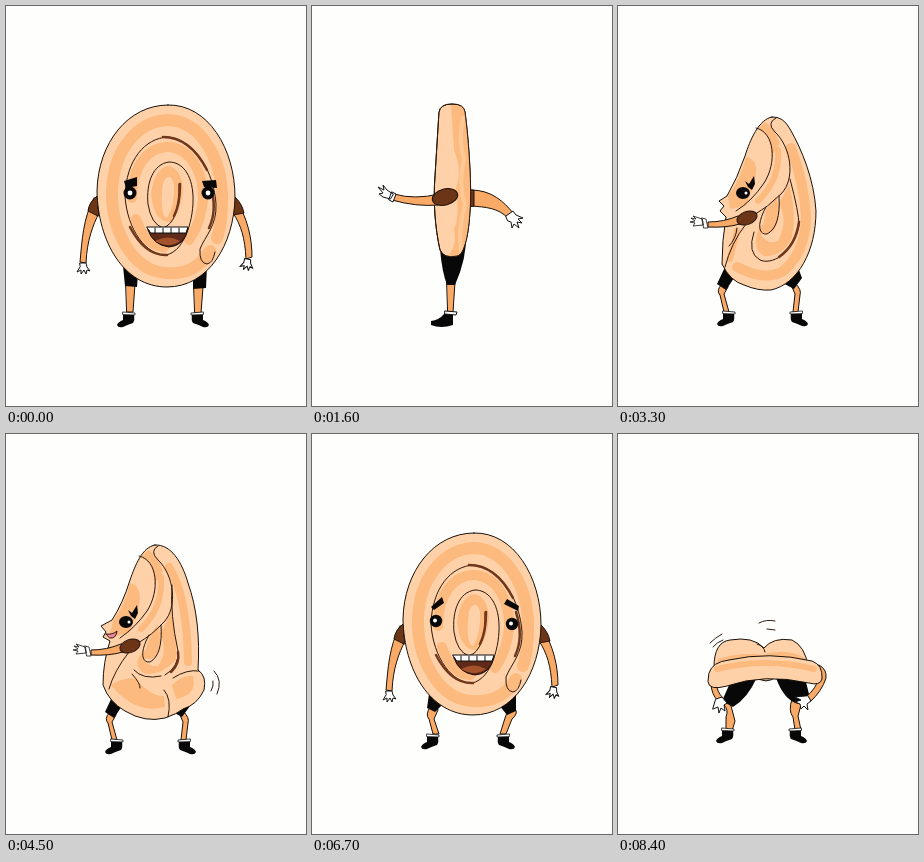
Animation, 300 px wide and 400 px high, one loop 8500 ms. Source, as an HTML page:

```html
<!DOCTYPE html>
<html lang="en">
<head>
<meta charset="utf-8">
<title>Dancing roll</title>
<style>
html, body { margin: 0; width: 100%; height: 100%; overflow: hidden; background: #fefffd; }
svg { display: block; width: 100%; height: 100%; }
path, ellipse, circle { stroke-linecap: round; stroke-linejoin: round; }

.dough { fill: #ffd1a8; stroke: #181008; }
.pale { fill: #ffd1a8; }
.tan { fill: #fcba7e; }
.band { fill: none; stroke: #fcba7e; }
.arm { fill: #f9aa66; stroke: #181008; }
.sleeve { fill: #6c3517; stroke: #20120a; }
.line { fill: none; stroke: #2a170c; }
.cinnamon { fill: none; stroke: #70371c; stroke-width: 2.5; }
.white { fill: #fff; stroke: #111; }
.ink { fill: #080808; }
.lip { fill: #ee8e9c; stroke: #301010; }

/* One loop of poses */
.show { visibility: hidden; animation: 8.5s step-end infinite; }
.front { animation-name: front; }
.side { animation-name: side; }
.turned { animation-name: turned; }
.bent { animation-name: bent; }
.stand { animation-name: stand; }
.crouch { animation-name: crouch; }
.squat { animation-name: squat; }
.bump { animation-name: bump; }
.rise { animation-name: rise; }

@keyframes front {
  0%, 77.647% { visibility: visible; }
  18.824%, 81.176%, 100% { visibility: hidden; }
}
@keyframes side {
  0%, 29.412%, 77.647%, 100% { visibility: hidden; }
  18.824%, 70.588% { visibility: visible; }
}
@keyframes turned {
  0%, 70.588%, 100% { visibility: hidden; }
  29.412% { visibility: visible; }
}
@keyframes bent {
  0% { visibility: hidden; }
  81.176%, 100% { visibility: visible; }
}
@keyframes stand {
  0% { visibility: visible; }
  5.882%, 100% { visibility: hidden; }
}
@keyframes crouch {
  0%, 18.824%, 81.176%, 100% { visibility: hidden; }
  5.882%, 77.647% { visibility: visible; }
}
@keyframes squat {
  0%, 42.353%, 51.765%, 61.176%, 100% { visibility: hidden; }
  29.412%, 47.059%, 56.471% { visibility: visible; }
}
@keyframes bump {
  0%, 47.059%, 56.471%, 64.706%, 100% { visibility: hidden; }
  42.353%, 51.765%, 61.176% { visibility: visible; }
}
@keyframes rise {
  0%, 70.588%, 100% { visibility: hidden; }
  64.706% { visibility: visible; }
}

/* Beat of five drawings */
.beat { animation: .5s step-end infinite; }
.bob { animation-name: bob; transform-origin: 160px 280px; }
.lean { animation-name: lean; transform-origin: 138px 300px; }
.reach { animation-name: reach; transform-origin: 133px 191px; }
.fling { animation-name: fling; transform-origin: 161px 192px; }
.dip { animation-name: dip; }
.push { animation-name: push; }
.wag { animation-name: wag; transform-origin: 148px 250px; }
.blur { animation-name: blur; }

@keyframes bob {
  0%, 40%, 100% { transform: none; }
  20% { transform: translateY(1px); }
  60% { transform: translateY(-1.5px) rotate(.6deg); }
  80% { transform: translateY(-1px); }
}
@keyframes lean {
  0%, 100% { transform: rotate(-1deg); }
  20% { transform: none; }
  40% { transform: rotate(1deg); }
  60% { transform: rotate(.5deg); }
  80% { transform: rotate(-1.5deg); }
}
@keyframes reach {
  0%, 100% { transform: translateX(-6px) rotate(-5deg); }
  20% { transform: none; }
  40% { transform: rotate(7deg); }
  60% { transform: translateX(-5px) rotate(2deg); }
  80% { transform: translateX(-12px) rotate(-4deg); }
}
@keyframes fling {
  0%, 100% { transform: rotate(-7deg); }
  20% { transform: none; }
  40% { transform: rotate(-10deg); }
  60% { transform: rotate(-18deg); }
  80% { transform: rotate(-12deg); }
}
@keyframes dip {
  0%, 60%, 100% { transform: none; }
  20% { transform: translateY(-2px); }
  40% { transform: translateY(-1px); }
  80% { transform: translateY(1px); }
}
@keyframes push {
  0%, 60%, 100% { transform: none; }
  20% { transform: translate(2px, -1px); }
  40% { transform: translate(1px, 1px); }
  80% { transform: translate(1px, 0); }
}
@keyframes wag {
  0%, 100% { transform: translate(-3px, 1px) rotate(-1.5deg); }
  20% { transform: translate(-1px, -2px); }
  40% { transform: translate(3px, 1px) rotate(1.5deg); }
  60% { transform: translate(1px, -2px); }
  80% { transform: none; }
}
@keyframes blur {
  0%, 60%, 80%, 100% { visibility: inherit; }
  20%, 40% { visibility: hidden; }
}
</style>
</head>
<body>
<svg viewBox="0 0 300 400">
<defs>
  <g id="shoe">
    <path class="ink" d="M5 0 L16 0 Q17 5 15 8 Q9 10 5 12 Q0 13 -1 10 Q0 7 5 5 Z"/>
    <path class="white" d="M5 -3 L17 -2 L17 0 L5 -.5 Z" stroke-width=".8"/>
  </g>
  <path id="hand" class="white" d="M-3 -3 L3 -3 L4 1 L7 5 L4 4 L3 8 L1 4 L-2 8 L-2 4 L-6 6 L-3 1 Z"/>
  <g id="eye">
    <circle class="ink" r="6.5"/>
    <circle r="2.4" fill="#fff"/>
  </g>
  <g id="wideEye">
    <circle class="ink" r="6.2"/>
    <circle cx="-1" cy="-.5" r="2" fill="#fff"/>
  </g>
  <g id="legsBent">
    <path class="arm" d="M103 279 Q98 285 102 289 L106 306 L111 306 L106 288 L110 281 Z"/>
    <path class="arm" d="M177 277 Q184 284 182 289 L180 306 L175 306 L177 288 L174 281 Z"/>
    <path class="ink" d="M107 261 L116 272 L108 284 L99 278 Z M161 275 L181 264 L184 272 L176 283 Z"/>
    <use href="#shoe" transform="translate(100 308)"/>
    <use href="#shoe" transform="matrix(-1 0 0 1 189 308)"/>
  </g>
  <g id="face">
    <ellipse class="ink" cx="125" cy="187" rx="7" ry="6"/>
    <circle cx="128" cy="187" r="1.5" fill="#fff"/>
    <path class="ink" d="M127 175 L131 178 L136 170 L137 178 L134 184 L130 181 Z"/>
  </g>
  <g id="pushArm">
    <path class="arm" d="M120 210 Q106 216 90 216 L90 221 Q108 222 122 218 Z"/>
    <ellipse class="sleeve" cx="129" cy="212" rx="10.5" ry="6.5" transform="rotate(-20 129 212)"/>
    <path class="white" d="M84 212 L88 213 L90 222 L86 222 Z M84 213 L75 210 L78 213 L73 212 L77 215 L72 216 L77 217 L75 220 L85 219 Z" stroke-width=".8"/>
  </g>
  <clipPath id="slim"><path id="slimPath" d="M127 106 Q128 98 140 98 Q152 98 153 106 C157 135 160 185 158 205 C157 225 153 249 145 250 Q132 253 128 244 C123 222 121 195 123 170 Z"/></clipPath>
</defs>

<g class="show front">
  <g class="beat bob">
    <path class="arm" d="M88 192 C77 212 76 235 74 256 L80 257 C81 234 87 219 93 207 Z"/>
    <path class="sleeve" d="M91 190 Q83 196 82 205 L92 210 Z"/>
    <path class="arm" d="M229 192 C242 212 246 233 246 251 L240 253 C239 232 235 219 227 207 Z"/>
    <path class="sleeve" d="M228 190 Q236 197 238 207 L227 209 Z"/>
    <use href="#hand" transform="translate(77 260)"/>
    <use href="#hand" transform="translate(241 256) rotate(12)"/>
  </g>

  <g class="show stand">
    <path class="arm" d="M120 278 L129 278 L127 306 L121 306 Z M188 281 L197 281 L195 307 L189 307 Z"/>
    <path class="ink" d="M117 260 L132 268 L131 281 L119 280 Z M187 269 L201 260 L200 282 L187 283 Z"/>
    <use href="#shoe" transform="translate(112 309)"/>
    <use href="#shoe" transform="matrix(-1 0 0 1 202 309)"/>
  </g>
  <g class="show crouch">
    <path class="arm" d="M118 273 Q113 281 117 285 L121 300 L127 300 L122 285 L126 276 Z M203 275 Q207 279 200 285 L194 300 L188 300 L193 284 L196 276 Z"/>
    <path class="ink" d="M117 260 L133 268 L123 278 L115 274 Z M187 271 L204 260 L204 277 L195 281 Z"/>
    <use href="#shoe" transform="translate(110 303)"/>
    <use href="#shoe" transform="matrix(-1 0 0 1 202 303)"/>
  </g>

  <g class="beat bob">
    <path class="dough" d="M162 99 C202 98 229 143 229 191 C228 239 202 281 161 281 C118 281 92 236 91 185 C92 137 122 99 162 99 Z"/>
    <path class="band" stroke-width="12" d="M204 245 C192 264 178 268 160 267 C126 265 105 224 106 184 C108 143 132 115 162 114 C195 115 216 153 216 192 Q216 218 211 232"/>
    <path class="band" stroke-width="10" d="M126 192 C126 160 142 140 164 141 C187 144 198 170 197 194 C195 218 186 229 183 234 M130 213 Q139 240 158 241"/>
    <path class="tan" d="M145 188 Q148 163 162 160 Q175 162 177 183 Q175 206 165 216 Q148 217 145 188 Z"/>
    <path class="pale" d="M157 177 Q164 164 168 178 Q169 200 161 212 Q153 210 157 177 Z"/>
    <path class="line" d="M119 190 C120 154 139 132 162 131 C190 134 208 167 210 198 C211 220 199 230 194 243 Q193 257 201 258 Q207 257 209 246 M119 190 C121 224 141 250 160 249 C180 245 188 210 187 190 C186 168 176 156 163 156 C147 158 140 177 142 198 Q145 218 157 222 Q174 216 173 178"/>
    <path class="cinnamon" d="M157 131 Q184 131 201 164 M204 178 Q212 203 203 222 M124 221 Q139 250 161 249 M174 178 Q174 199 168 210"/>
    <path d="M142 224 L182 223 Q178 240 163 241 Q147 239 142 224 Z" fill="#602a18" stroke="#180c08"/>
    <path d="M149 235 Q162 228 174 235 Q163 243 149 235 Z" fill="#a5532d"/>
    <path class="white" d="M141 221 L182 221 L180 227 L145 227 Z M149 222 V227 M157 222 V227 M165 222 V227 M173 222 V227"/>
    <g class="show stand">
      <use href="#eye" transform="translate(124 187)"/>
      <use href="#eye" transform="translate(202 187)"/>
      <path class="ink" d="M118 175 L131 171 L131 180 L120 182 Z M196 175 L210 174 L211 182 L198 181 Z"/>
    </g>
    <g class="show crouch">
      <use href="#wideEye" transform="translate(124 187)"/>
      <use href="#wideEye" transform="translate(200 190)"/>
      <path class="ink" d="M119 173 L130 163 L132 169 L122 176 Z M192 170 L195 165 L207 172 L206 177 Z"/>
    </g>
  </g>
</g>

<g class="show side">
  <path class="arm" d="M135 276 L143 276 L141 306 L136 306 Z"/>
  <path class="ink" d="M119 315 Q127 314 132 308 L141 308 L141 319 Q129 323 119 319 Z"/>
  <path class="white" d="M133 305 L145 306 L144 309 L133 308 Z"/>
  <g class="beat lean">
    <path class="ink" d="M128 243 L154 228 Q155 252 143 279 L135 279 Q130 266 128 243 Z"/>
    <g class="beat fling">
      <path class="arm" d="M159 184 C180 184 192 196 201 207 L196 212 C186 202 174 201 159 200 Z"/>
      <path class="sleeve" d="M157 184 L162 184 L162 200 L157 201 Z"/>
      <path class="white" d="M194 210 L201 205 L204 209 L211 212 L206 213 L210 217 L205 216 L207 222 L202 218 L200 222 L199 216 L196 215 Z"/>
    </g>
    <use href="#slimPath" class="dough"/>
    <g clip-path="url(#slim)">
      <path class="tan" d="M139 99 L166 99 L166 253 L134 253 Q146 240 142 224 Q149 205 143 185 Q151 165 142 144 Z"/>
      <path d="M151 112 Q146 135 152 153 Q146 178 153 199 Q146 223 149 246" fill="none" stroke="#ffc996" stroke-width="4"/>
    </g>
    <use href="#slimPath" class="line"/>
    <g class="beat reach">
      <path class="arm" d="M127 188 Q103 194 82 188 L80 194 Q104 201 127 199 Z"/>
      <path class="white" d="M80 186 L84 188 L81 196 L77 194 Z M78 193 L71 191 L67 188 L71 187 L66 181 L72 184 L71 179 L75 184 L81 188 Z"/>
      <ellipse class="sleeve" cx="133" cy="191" rx="13" ry="8" transform="rotate(-15 133 191)"/>
    </g>
  </g>
</g>

<g class="show turned">
  <g class="show squat">
    <use href="#legsBent"/>
    <g class="beat dip">
      <path class="dough" d="M154 111 C141 113 132 134 127 150 Q119 173 109 190 L101 195 L106 200 L102 205 L108 211 Q104 234 104 258 Q112 275 126 279 Q140 285 153 284 C180 278 198 245 198 205 C196 173 184 144 172 123 Q165 110 154 111 Z"/>
      <path class="tan" d="M128 151 Q143 154 136 177 L128 200 L112 203 L110 190 Q122 175 128 151 Z M141 122 Q154 129 153 151 L162 137 Q155 120 147 116 Z M171 178 Q179 206 174 232 Q164 251 146 250 Q133 242 141 222 Q158 207 171 178 Z"/>
      <path class="pale" d="M160 195 Q171 214 160 235 Q149 239 143 229 L149 202 Z"/>
      <path class="tan" d="M158 190 Q164 206 157 223 Q150 230 144 226 L148 204 Z"/>
      <path class="band" stroke-width="10" d="M119 261 Q145 275 164 266 Q187 248 188 211 Q186 176 173 142"/>
      <path class="band" stroke-width="6" d="M160 144 Q162 174 140 195 M119 225 L112 253"/>
      <path class="line" d="M138 122 C157 126 159 157 146 177 Q134 195 118 205 M158 112 Q148 117 157 126 C173 141 178 173 163 188 Q150 201 136 209 M172 173 Q181 207 181 219 C175 249 153 259 142 254 Q129 247 136 226 M148 201 C138 219 141 229 149 228 Q163 221 161 190 M128 218 Q113 237 107 261 M119 222 Q118 233 111 240"/>
      <path class="cinnamon" d="M181 216 Q178 239 161 251"/>
      <use href="#face"/>
    </g>
    <g class="beat push"><use href="#pushArm"/></g>
  </g>

  <g class="show bump">
    <use href="#legsBent"/>
    <g class="beat dip">
      <path class="dough" d="M149 111 C136 113 129 132 124 146 Q117 169 106 186 L95 192 L100 198 L97 203 L104 207 Q97 228 97 251 Q103 268 119 277 Q139 289 159 284 Q171 280 177 275 Q191 271 198 256 Q201 242 192 236 C194 204 191 174 182 149 C176 128 165 110 149 111 Z"/>
      <path class="tan" d="M124 149 Q138 152 132 176 L123 199 L103 203 L107 187 Q119 171 124 149 Z M136 122 Q149 129 148 151 L157 137 Q150 119 142 116 Z M165 177 Q171 205 170 226 Q156 241 139 240 Q126 232 135 220 Q154 206 165 177 Z"/>
      <path class="pale" d="M153 197 Q163 217 152 232 Q143 233 138 226 L143 203 Z"/>
      <path class="tan" d="M152 190 Q157 207 150 222 Q143 228 138 223 L143 204 Z M105 251 Q119 242 130 245 Q145 263 158 262 L159 273 Q129 281 105 251 Z M166 251 Q178 240 187 242 Q192 261 170 265 Z"/>
      <path class="band" stroke-width="8" d="M163 133 Q181 161 182 228"/>
      <path class="band" stroke-width="6" d="M155 143 Q157 174 135 195"/>
      <path class="line" d="M133 122 C152 126 154 157 141 177 Q130 193 114 204 M152 112 Q143 117 152 126 C168 141 172 173 158 188 Q146 201 132 209 M166 151 Q164 181 172 217 Q173 233 159 241 M143 201 C133 219 136 229 144 228 Q157 221 155 191 M123 218 Q108 237 103 255 M128 236 Q137 246 155 242 M126 240 Q135 250 134 254 M167 244 Q181 235 193 237 M158 256 Q166 265 162 283"/>
      <path class="cinnamon" d="M172 218 Q174 230 165 238"/>
      <use href="#face" transform="translate(-5 1)"/>
      <path class="lip" d="M100 200 Q107 201 111 197 Q110 205 104 204 Z"/>
    </g>
    <g class="beat push"><use href="#pushArm" transform="translate(-5 0)"/></g>
    <path class="line beat blur" d="M205 257 Q208 252 207 247 M208 237 Q217 246 211 260"/>
  </g>

  <g class="show rise">
    <path class="arm" d="M107 275 L116 275 L114 306 L109 306 Z M169 275 L177 275 L175 306 L171 306 Z"/>
    <path class="ink" d="M103 257 L116 277 L116 283 L105 281 Z M166 275 L181 275 L180 281 L168 281 Z"/>
    <use href="#shoe" transform="translate(103 309)"/>
    <use href="#shoe" transform="matrix(-1 0 0 1 186 309)"/>
    <g class="beat dip">
      <path class="dough" d="M153 107 C139 110 131 131 127 146 Q120 169 110 186 L99 191 L104 196 L100 201 L107 206 Q102 229 102 253 Q107 271 122 275 Q142 283 166 279 Q190 280 197 264 Q203 246 197 235 C197 204 193 173 185 149 C178 126 167 106 153 107 Z"/>
      <path class="tan" d="M128 147 Q142 150 136 173 L127 196 L107 201 L110 186 Q122 171 128 147 Z M140 118 Q153 125 152 147 L161 133 Q154 116 146 112 Z M169 177 Q176 205 173 226 Q161 245 143 246 Q129 235 139 219 Q157 206 169 177 Z"/>
      <path class="pale" d="M158 192 Q168 213 157 230 Q148 232 142 224 L148 199 Z"/>
      <path class="tan" d="M157 187 Q161 205 154 219 Q147 225 142 220 L147 201 Z M112 256 Q124 246 133 252 Q149 264 164 257 L164 268 Q136 278 112 256 Z M172 246 Q184 237 191 244 Q194 259 174 262 Z"/>
      <path class="band" stroke-width="8" d="M167 130 Q184 162 186 229"/>
      <path class="band" stroke-width="6" d="M159 139 Q161 170 139 191"/>
      <path class="line" d="M138 118 C156 122 158 153 145 173 Q134 190 118 201 M157 108 Q147 113 156 122 C172 137 176 169 162 184 Q150 197 136 205 M170 168 Q178 203 176 220 C171 241 154 252 142 249 Q129 241 135 222 M147 197 C137 215 140 225 148 224 Q161 217 159 187 M127 214 Q112 233 106 257 M118 218 Q117 229 110 237 M162 233 Q171 236 170 254 Q169 269 162 279 M176 231 Q187 230 197 235"/>
      <path class="cinnamon" d="M176 217 Q174 232 164 241"/>
      <use href="#face" transform="translate(-2 -3)"/>
      <path class="lip" d="M104 197 Q111 197 114 193 Q117 200 107 202 Z"/>
    </g>
    <g class="beat push"><use href="#pushArm" transform="translate(-3 -4)"/></g>
  </g>
</g>

<g class="show bent">
  <path class="arm" d="M106 271 Q111 276 108 283 L108 297 L114 297 L117 287 L112 268 Z M174 265 Q170 277 175 283 L177 296 L183 296 L180 282 L184 267 Z"/>
  <use href="#shoe" transform="translate(99 297)"/>
  <use href="#shoe" transform="matrix(-1 0 0 1 188 297)"/>
  <path class="ink" d="M112 249 L139 243 Q130 264 115 273 L104 267 Z M158 244 L188 248 L191 260 L180 270 Q166 266 158 244 Z"/>
  <path class="arm" d="M93 249 Q93 260 100 267 L105 264 Q99 258 98 249 Z M201 231 Q209 235 208 244 Q204 257 192 268 L187 264 Q199 254 201 243 Z"/>
  <path class="white" d="M98 265 L104 263 L109 269 L106 271 L107 277 L103 274 L101 279 L100 273 L95 275 Z M190 262 L193 267 L189 270 L190 276 L186 272 L183 275 L182 270 L177 268 L183 266 L177 263 Z"/>
  <g class="beat wag">
    <path class="dough" d="M138 243 Q148 251 158 243 Z"/>
    <path class="dough" d="M96 233 Q96 208 112 206 Q135 202 146 214 Q155 203 174 206 Q187 212 190 232 Z"/>
    <path class="tan" d="M100 225 Q126 217 144 221 Q167 213 187 224 L189 232 L98 232 Z"/>
    <path class="line" d="M139 210 Q146 212 147 218"/>
    <path class="dough" d="M91 239 Q94 228 111 226 Q151 217 194 227 Q205 231 204 245 Q202 252 191 249 Q146 239 109 252 Q91 257 90 248 Z"/>
    <path class="band" stroke-width="6" d="M99 235 Q149 223 196 235"/>
  </g>
  <path class="line beat blur" d="M92 209 Q97 204 104 200 M95 213 Q99 208 105 206 M141 189 Q148 185 157 187 M149 195 L157 196"/>
</g>
</svg>
</body>
</html>
```
